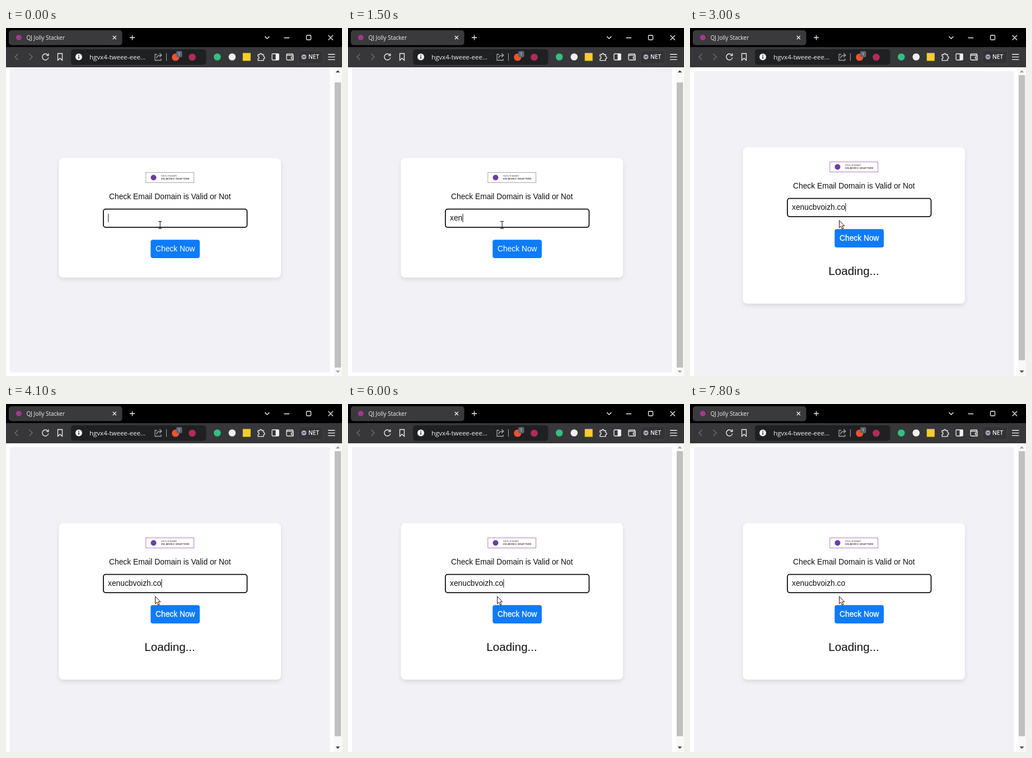
Write an HTML page that moves like this. It is 600 px wide and 620 px high and loops after 8000 ms.

```html
<!DOCTYPE html>
<html lang="en">
<head>
<meta charset="utf-8">
<title>Domain check</title>
<style>
  html, body { margin: 0; width: 100%; height: 100%; overflow: hidden; background: #fff; }
  svg { display: block; width: 600px; height: 620px; }
  .page { font: 13.8px "Liberation Sans", Arial, sans-serif; fill: #111; }
  .chrome { font-family: "Open Sans", "Noto Sans", sans-serif; fill: #f2f2f2; }
  .line { fill: none; stroke: #f0f0f0; stroke-width: 1.3; }
  .dim { stroke: #737377; }
  .badge { font-family: Inter, sans-serif; fill: #333; }
</style>
</head>
<body>
<svg viewBox="0 0 600 620" xmlns="http://www.w3.org/2000/svg">
  <defs>
    <filter id="shadow" x="-10%" y="-10%" width="120%" height="125%">
      <feDropShadow dx="0" dy="3.5" stdDeviation="3.5" flood-color="#000" flood-opacity=".1"/>
    </filter>
  </defs>

  <rect width="600" height="620" fill="#fff"/>
  <rect id="backdrop" x="7" width="571.5" fill="#f2f1f5"/>

  <g class="page">
    <rect id="card" x="94.5" width="396.5" rx="8" fill="#fff" filter="url(#shadow)"/>
    <g id="form">
      <rect id="badge" x="249.8" y="257.5" width="85.8" height="18" fill="#fff" stroke-width="1"/>
      <circle cx="263.5" cy="266.5" r="5" fill="#6b3fa0"/>
      <g class="badge">
        <text x="276.8" y="265" font-size="4">100% in bloom</text>
        <text x="276.8" y="270.2" font-size="4" font-weight="700" letter-spacing=".45">VELMORIC DRAFTERS</text>
      </g>
      <text x="184" y="305">Check Email Domain is Valid or Not</text>
      <rect x="173.9" y="322.7" width="256.6" height="32.4" rx="4" fill="#fff" stroke="#101010" stroke-width="1.8"/>
      <text id="entry" x="182" y="343"></text>
      <rect id="caret" y="331" width="1" height="15" fill="#111"/>
      <rect x="258.3" y="377.3" width="87.7" height="32.8" rx="4" fill="#0d7bfa"/>
      <text id="label" x="267" y="398.3" fill="#fff" stroke="#fff">Check Now</text>
    </g>
    <text id="loading" x="247.3" y="439.5" font-size="20.6">Loading...</text>
  </g>

  <path id="beam" d="M272 344.5h2.2l1 .8 1-.8h2.2M272 357.3h2.2l1-.8 1 .8h2.2M275.2 345v12" fill="none" stroke="#111" stroke-width="1.1"/>
  <path id="arrow" d="M266.6 342.8v13.2l3-2.8 2.2 5 2.2-1-2.2-4.8h4z" fill="#fff" stroke="#111"/>

  <!-- scrollbar -->
  <rect x="585" y="70" width="15" height="550" fill="#f9f9f9"/>
  <rect id="thumb" x="587" width="11.3" height="508" fill="#c0c0c1"/>
  <path id="up" d="M588.5 79.3l4-4 4 4z"/>
  <path id="down" d="M588.5 610.3l4 4 4-4z"/>

  <!-- browser frame -->
  <g class="chrome">
    <rect width="600" height="35" fill="#000"/>
    <rect y="34" width="600" height="36" fill="#37373a"/>
    <rect x="5" y="4" width="202.5" height="26.5" rx="5" fill="#3a3a3d"/>
    <circle cx="22.8" cy="17" r="4.8" fill="#a8368f"/>
    <text x="36.5" y="20.8" font-size="10">QJ Jolly Stacker</text>
    <path class="line" d="M190.8 14l6 6m0-6l-6 6M221 17h9M225.5 12.5v9M462.3 15l4 4 4-4M496.5 17.5h9.5M575.5 13l8.5 8.5m0-8.5l-8.5 8.5"/>
    <rect class="line" x="536.5" y="13" width="8" height="8" rx="1.5"/>

    <path class="line dim" d="M21.5 46l-5.5 5.5 5.5 5.5M41.5 46l5.5 5.5-5.5 5.5"/>
    <path class="line" stroke-width="1.5" d="M74.8 48.2a5.5 5.5 0 1 0 1 4.3M75.8 45.2v4h-4M92.5 45.5h8v12l-4-3.6-4 3.6z"/>

    <rect x="116" y="38" width="241.5" height="27.5" rx="5" fill="#1f2022"/>
    <circle cx="130" cy="51.5" r="6" fill="#f2f2f2"/>
    <path d="M130 50.5v4.2M130 47.7v1.5" stroke="#1f2022" stroke-width="1.5"/>
    <text x="149" y="55.7" font-size="11.5">hgvx4-tweee-eee...</text>
    <path class="line" style="stroke:#a5a5a8" d="M270 47h-4v10.5h11v-3M269 54c0-4 3-5.5 8-5.5M274.3 45l3.5 3.5-3.5 3.5"/>
    <path d="M286.5 45v13.5" stroke="#a5a5a8"/>
    <circle cx="302.8" cy="52" r="6.6" fill="#f4512c"/>
    <rect x="304" y="41" width="10.5" height="11" rx="2.5" fill="#5d6472"/>
    <text x="309.2" y="49.4" font-size="7.5" text-anchor="middle">1</text>
    <circle cx="332.5" cy="52" r="6.3" fill="#b52a55"/>

    <circle cx="377.3" cy="51.5" r="6.3" fill="#2fc27f"/>
    <circle cx="403.8" cy="51.5" r="6.3" fill="#f0f0f0"/>
    <rect x="422.8" y="44.5" width="14" height="14" fill="#f6cf22"/>
    <path class="line" d="M450 47.5h3a2 2 0 1 1 4 0h3v3.3a2 2 0 1 1 0 4v3h-10v-3.2a2 2 0 1 0 0-4z"/>
    <rect class="line" x="475" y="46" width="12" height="11" rx="1.5"/>
    <rect x="481.5" y="46" width="6" height="11" fill="#f0f0f0"/>
    <path class="line" d="M512 48.5v-2.3h-9.5a1.5 1.5 0 0 0-1.5 1.5v7.8a1.5 1.5 0 0 0 1.5 1.5h10.5v-8.5h-12M513 51.3h-3.5v3h3.5"/>
    <rect x="522" y="39.5" width="45" height="24.5" rx="5" fill="#333336" stroke="#464649"/>
    <circle cx="532" cy="51.5" r="4.5" fill="#a9a9b8"/>
    <path d="M529.5 51.5h5" stroke="#333336" stroke-width="1.3"/>
    <text x="540" y="55.1" font-size="10" font-weight="600">NET</text>
    <path class="line" d="M575 47h12.5M575 51.7h12.5M575 56.4h12.5"/>
  </g>
</svg>
<script>
  const LOOP = 8000;
  const SUBMIT = 2800;
  const WORD = "xenucbvoizh.co";
  // [time, characters typed by then]
  const KEYS = [[1300, 1], [1400, 2], [1500, 3], [1600, 5], [1700, 7], [1800, 9],
                [1900, 11], [2200, 12], [2400, 13], [2500, 14]];
  const CARET_TOGGLES = [200, 700, 1200, 1300, 3400, 3900, 4400, 5000, 5500, 6000, 6500, 7100, 7600];

  const el = id => document.getElementById(id);
  const set = (id, attrs) => {
    for (const name in attrs) el(id).setAttribute(name, attrs[name]);
  };
  const show = (id, on) => set(id, { visibility: on ? "visible" : "hidden" });

  function render(t) {
    const sent = t >= SUBMIT;
    const typed = KEYS.reduce((count, [time, n]) => t >= time ? n : count, 0);
    const caretOn = CARET_TOGGLES.filter(time => t >= time).length % 2 === 0;

    el("entry").textContent = WORD.slice(0, typed);
    set("caret", { x: 182.3 + (typed ? el("entry").getComputedTextLength() : 0) });
    show("caret", caretOn);

    set("backdrop", sent ? { y: 77, height: 543 } : { y: 70, height: 543.5 });
    set("card", sent ? { y: 212.3, height: 278.7 } : { y: 231.8, height: 212.7 });
    set("form", { transform: `translate(0 ${sent ? -19 : 0})` });
    set("badge", { stroke: sent ? "#b283bd" : "#aaa5ad" });
    set("label", { "stroke-width": sent ? 0.3 : 0 });
    set("thumb", { y: sent ? 84 : 97 });
    set("up", { fill: sent ? "#a0a0a0" : "#444" });
    set("down", { fill: sent ? "#444" : "#a0a0a0" });
    show("loading", sent);
    show("arrow", sent);
    show("beam", !sent);
  }

  const start = performance.now();
  function tick() {
    render((performance.now() - start) % LOOP);
    requestAnimationFrame(tick);
  }
  tick();
</script>
</body>
</html>
```
